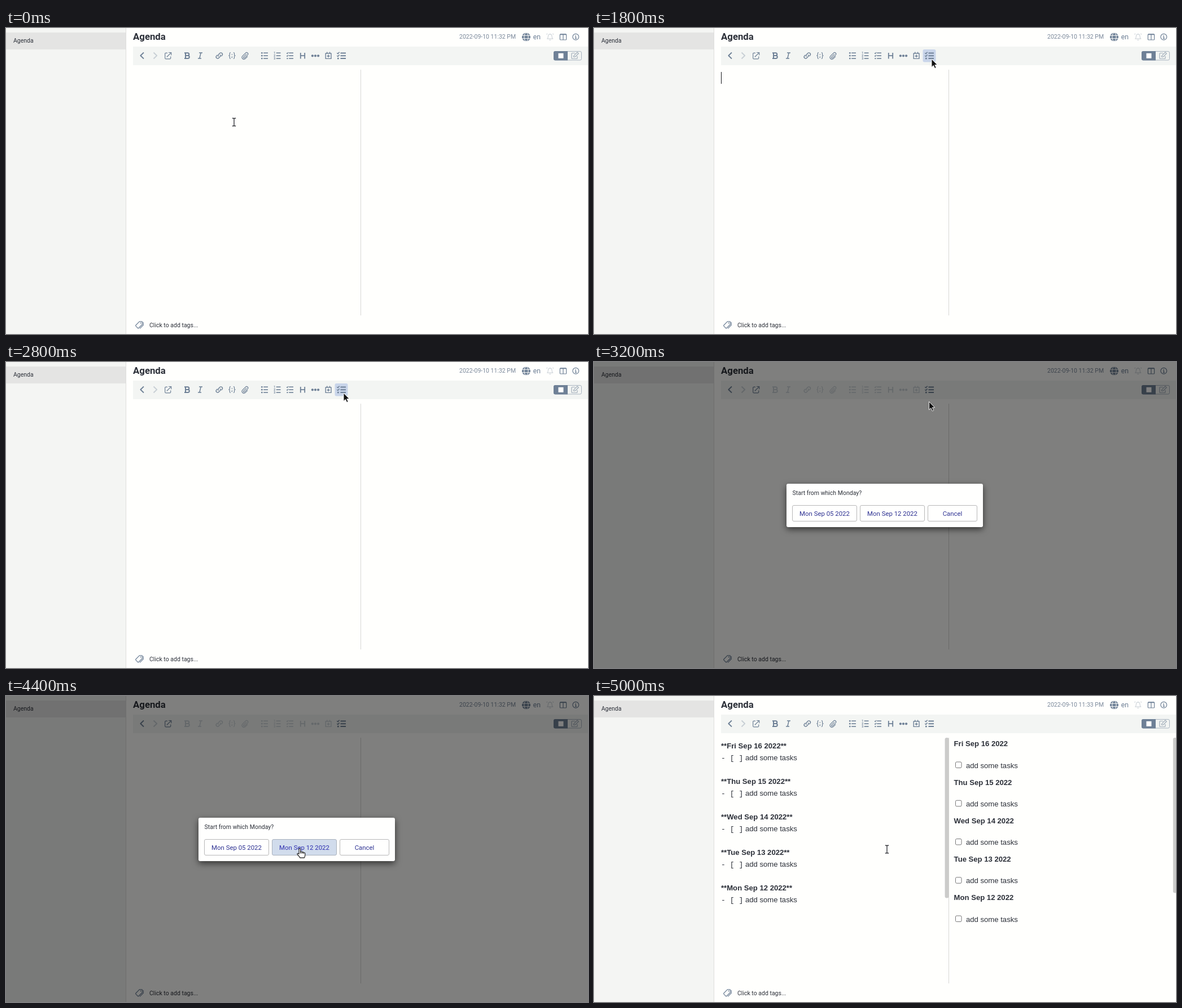
These frames come from a looping animation (1031x543 px, 6600 ms). An HTML page:

```html
<!DOCTYPE html>
<html lang="en">
<head>
<meta charset="utf-8">
<title>Agenda</title>
<style>
  html, body { margin: 0; width: 100%; height: 100%; overflow: hidden; background: #fffffd; }
  svg { display: block; width: 100vw; height: 100vh; }
  text { font: 10.5px Roboto, sans-serif; fill: #2c3039; white-space: pre; }
  .title { font-size: 16.8px; font-weight: 700; }
  .date { fill: #7b899b; }
  .body text { font: 13.125px "Liberation Sans", Arial, sans-serif; }
  .body .bold { font-weight: 700; }
  .mono { font-family: "Liberation Mono", monospace; }
  .icon { fill: none; stroke: #6e8096; stroke-width: 1.5; stroke-linejoin: round; }
  .icon .solid, .icon text { fill: #6e8096; stroke: none; }
  .thin { stroke-width: 1.2; }
  .faint { opacity: .32; }
  .blocked .edit { opacity: .3; }
  .button rect { fill: #fffffe; stroke: #b8b8b8; }
  .button text { font-size: 11.4px; fill: #2d3192; text-anchor: middle; }
  #dialog > rect { filter: drop-shadow(0 4px 6px #0009); }
  #tooltip rect { filter: drop-shadow(0 2px 2px #0005); }
</style>
</head>
<body>
<svg viewBox="0 0 1031 543">
  <rect width="1031" height="543" fill="#fffffd"/>
  <rect width="213" height="543" fill="#f4f5f3"/>
  <rect y="8" width="213" height="30" fill="#e4e4e3"/>
  <path d="M212.5 0V543" stroke="#dededc"/>
  <text x="13" y="26">Agenda</text>
  <text class="title" x="225" y="21.4">Agenda</text>
  <text class="date" id="clock" x="803" y="19.3"></text>
  <rect x="225" y="33" width="806" height="33" fill="#f3f5f3"/>
  <path d="M628.5 74V510" stroke="#d8d8d6"/>
  <rect id="hover" x="582.5" y="38" width="23" height="22.5" rx="3" fill="#c9d5ea"/>

  <g id="toolbar" class="icon">
    <path d="M244 43.5L238.3 49L244 54.5" stroke-width="1.8"/>
    <path class="faint" d="M261.5 43.5L267.2 49L261.5 54.5" stroke-width="1.8"/>
    <path class="thin" d="M286 44.3H283Q281.7 44.3 281.7 45.6V53.6Q281.7 54.8 283 54.8H290.4Q291.7 54.8 291.7 53.6V50.5M284.8 51.5L292.3 43.8M288 43.5H292.7V48.2" stroke-width="1.4"/>
    <g class="edit" id="editIcons">
      <path d="M316 44.3H322A2.3 2.3 0 0 1 322 48.9H318M322 48.9A2.5 2.5 0 0 1 322.5 53.9H316M318 44.3V53.9" stroke-width="2"/>
      <path d="M342 44H348M340 54H346M345.2 44L342.8 54"/>
      <path d="M376.3 50.8A2.8 2.8 0 0 1 376.6 47L379 44.6A2.7 2.7 0 0 1 382.8 48.4L381.3 50M379.3 47.3A2.8 2.8 0 0 1 379 51L376.6 53.4A2.7 2.7 0 0 1 372.8 49.6L374.3 48" stroke-width="1.4"/>
      <path class="thin" d="M398 43.5Q396.3 43.5 396.3 45V47.5Q396.3 49 394.6 49Q396.3 49 396.3 50.5V53Q396.3 54.5 398 54.5M402.8 43.5Q404.5 43.5 404.5 45V47.5Q404.5 49 406.2 49Q404.5 49 404.5 50.5V53Q404.5 54.5 402.8 54.5M400.4 46.2V47.8M400.6 50.5L400 53.2"/>
      <path class="thin" d="M426 46.3L420.9 51.4A1.2 1.2 0 0 0 422.7 53.1L428 47.8A2.4 2.4 0 0 0 424.4 44.3L419.1 49.6A3.4 3.4 0 0 0 424 54.4L428 50.4"/>
      <path d="M525.5 49M521.8 44V54.5M529.2 44V54.5M521.8 49.2H529.2" stroke-width="1.8"/>
      <path d="M566.2 45H576V54.4H566.2ZM568.7 42.6V45M573.5 42.6V45M571.1 47.3V52.3M568.6 49.8H573.6" stroke-width="1.4"/>
    </g>
    <path d="M592.5 44.5H602M592.5 49.2H602M592.5 54H602" stroke-width="1.9"/>
    <path d="M586.3 44.2L587.9 45.7L590.6 42.7M586.3 49L587.9 50.5L590.6 47.5"/>
    <circle class="solid" cx="588.3" cy="54" r="1.5"/>
  </g>

  <g class="icon">
    <rect x="970.5" y="41.5" width="49" height="15.5" rx="2.5" stroke="#a9b4c0" stroke-width="1"/>
    <path class="solid" d="M973 41H995V57.5H973Q970 57.5 970 54.5V44Q970 41 973 41Z"/>
    <rect x="978.5" y="44.8" width="9" height="9" style="fill:#fff;stroke:none"/>
    <path class="thin" opacity=".6" d="M1008 44.5H1003Q1002 44.5 1002 45.5V53.5Q1002 54.5 1003 54.5H1011Q1012 54.5 1012 53.5V50M1005.5 51.5L1006 49L1012 43L1014.3 45.2L1008.2 51.2Z"/>
    <circle class="solid" cx="921.5" cy="16" r="7.6"/>
    <g stroke="#fffffd" stroke-width="1"><ellipse cx="921.5" cy="16" rx="3.6" ry="7.6"/><path d="M914 13.3H929M914 18.7H929"/></g>
    <text x="933.7" y="20" style="font-size:12.25px">en</text>
    <path class="thin faint" d="M958.8 19.2Q960.5 17.5 960.5 14.5Q960.5 11.2 963.8 11.2Q967 11.2 967 14.5Q967 17.5 968.8 19.2ZM963.8 9.8V11.2M962.4 20.8Q963.8 22.2 965.2 20.8M957.5 11.5L959 10M970 11.5L968.5 10"/>
    <path class="thin" d="M982.3 10.8H991.7Q992.6 10.8 992.6 11.7V20.2Q992.6 21 991.7 21H982.3Q981.4 21 981.4 20.2V11.7Q981.4 10.8 982.3 10.8ZM981.4 11.6H992.6M987 11V21"/>
    <g class="thin"><circle cx="1009.3" cy="15.8" r="5.4"/><path d="M1008 15.3H1009.5V18.6M1007.9 18.6H1011M1009.3 12.6V13.9"/></g>
    <path class="thin" d="M236.3 520.8H240.6Q241.4 520.8 241.4 521.6V526L234.9 532.5Q234.2 533.2 233.5 532.5L229.9 528.9Q229.2 528.2 229.9 527.5ZM242.6 522.2L243.3 522.9V527L237 533.3"/>
    <circle class="solid" cx="238.7" cy="523.6" r="1"/>
  </g>
  <text x="254" y="530.8">Click to add tags...</text>

  <g class="body" id="source">
    <rect x="621.6" y="74" width="7" height="284.5" rx="3.2" fill="#cbcbca"/>
  </g>
  <g class="body" id="preview">
    <rect x="1025.8" y="74" width="7" height="275.5" rx="3.2" fill="#cbcbca"/>
  </g>
  <rect id="caret" x="225" y="78" width="1" height="21" fill="#15171b"/>

  <g id="tooltip">
    <rect x="607" y="69" width="257" height="24" rx="2" fill="#333"/>
    <text x="614" y="84.5" style="fill:#eee">Insert a weekly agenda into the current note</text>
  </g>

  <rect id="shade" width="1031" height="543" opacity=".5"/>
  <g id="dialog">
    <rect x="341" y="216" width="348" height="77" rx="3" fill="#fffffe"/>
    <text x="351.5" y="236">Start from which Monday?</text>
  </g>

  <g id="arrow"><path d="M0 0V14.5L3.3 11.4L5.8 16.6L8.2 15.5L5.8 10.5H10.2Z" fill="#111" stroke="#fff" stroke-width=".9"/></g>
  <g id="beam" fill="none">
    <path id="beamShape" d="M-3.2 -6.8H-1Q0 -6.8 0 -5.8Q0 -6.8 1 -6.8H3.2M0 -6V6M-3.2 6.8H-1Q0 6.8 0 5.8Q0 6.8 1 6.8H3.2" stroke="#fff" stroke-width="2.6"/>
    <use href="#beamShape" style="stroke:#111"/>
    <path d="M-3.2 -6.8H-1Q0 -6.8 0 -5.8Q0 -6.8 1 -6.8H3.2M0 -6V6M-3.2 6.8H-1Q0 6.8 0 5.8Q0 6.8 1 6.8H3.2" stroke="#15171b" stroke-width="1.2"/>
  </g>
  <g id="hand"><path d="M-1.5 1.2Q-1.5 0 -.2 0Q1.1 0 1.1 1.2V6Q3.2 5.2 3.8 6.6Q5.9 6 6.5 7.4Q9.3 7 9.3 9.2V12Q9.3 14 8 16.6H.2Q-1.2 13.5 -4 11Q-5.2 9.4 -3.8 8.8Q-2.8 8.5 -1.5 10ZM1.1 6V9M3.8 6.8V9.3M6.5 7.6V9.6" fill="#fff" stroke="#111" stroke-width="1.1" stroke-linejoin="round"/></g>
</svg>

<script>
const LOOP = 6600;
const $ = id => document.getElementById(id);
const add = (parent, markup) => parent.insertAdjacentHTML("beforeend", markup);
const show = (id, visible) => $(id).style.display = visible ? "" : "none";
const between = (t, from, to) => t >= from && t < to;

// Three list icons: bullets, numbers and check marks.
[458, 480.5, 503].forEach((x, kind) => {
  [44.3, 49.2, 54.1].forEach((y, row) => {
    add($("editIcons"), `<path d="M${x - 1.8} ${y}H${x + 6}" stroke-width="1.6"/>`);
    const marker = [
      `<circle class="solid" cx="${x - 4.7}" cy="${y}" r="1.4"/>`,
      `<text x="${x - 6.2}" y="${y + 1.8}" style="font-size:5px;font-weight:700">${row + 1}</text>`,
      row < 2 ? `<path class="thin" d="M${x - 6} ${y}l1.2 1.2l2 -2.4"/>`
              : `<circle class="solid" cx="${x - 4.6}" cy="${y}" r="1.2"/>`
    ][kind];
    add($("editIcons"), marker);
  });
});
for (const x of [542.9, 548, 553.1])
  add($("editIcons"), `<circle class="solid" cx="${x}" cy="49.3" r="2.1"/>`);

["Fri Sep 16", "Thu Sep 15", "Wed Sep 14", "Tue Sep 13", "Mon Sep 12"].forEach((day, i) => {
  const y = 63 * i, py = 68.25 * i;
  add($("source"), `<text class="bold" x="225" y="${93 + y}">**${day} 2022**</text>
    <text x="225" y="${114 + y}"><tspan class="mono">- [ ]</tspan> add some tasks</text>`);
  add($("preview"), `<text class="bold" x="637.6" y="${89.3 + py}">${day} 2022</text>
    <rect x="640.5" y="${117 + py}" width="10.5" height="10.5" rx="2" fill="#fff" stroke="#777"/>
    <text x="659" y="${127.7 + py}">add some tasks</text>`);
});

[["Mon Sep 05 2022", 351.5, 114], ["Mon Sep 12 2022", 471.5, 114], ["Cancel", 591.5, 87]]
  .forEach(([label, x, width]) => add($("dialog"), `<g class="button">
    <rect x="${x}" y="254.5" width="${width}" height="28" rx="2.5"/>
    <text x="${x + width / 2}" y="272.8">${label}</text></g>`));
const choice = document.querySelectorAll(".button")[1];

// Pointer steps: start time, shape, x, y.
const pointer = [
  [0, "beam", 404, 167], [600, "beam", 456, 158.5], [800, "beam", 535, 123], [1000, "beam", 568, 87],
  [1200, "arrow", 587.5, 70.5], [1400, "arrow", 598, 55], [3200, "arrow", 593.5, 70.3],
  [3400, "arrow", 560.5, 143.5], [3600, "arrow", 527.5, 200.5], [3800, "arrow", 522.5, 253],
  [4000, "hand", 520.5, 264.5], [4400, "hand", 520.5, 270.5], [4600, "beam", 519, 272]
];
const caretOn = [[400, 1000], [1800, 2400], [2600, 2800]];

function draw(now) {
  const t = now % LOOP;
  const asking = between(t, 3200, 4600);
  const [, shape, x, y] = pointer.findLast(step => step[0] <= t);
  for (const name of ["beam", "arrow", "hand"]) show(name, name === shape);
  $(shape).setAttribute("transform", `translate(${x} ${y})`);

  show("caret", caretOn.some(([from, to]) => between(t, from, to)));
  show("hover", between(t, 1200, 3200));
  show("tooltip", between(t, 2000, 2800));
  show("shade", asking);
  show("dialog", asking);
  show("source", t >= 4600);
  show("preview", t >= 5000);
  $("toolbar").classList.toggle("blocked", asking);
  $("clock").textContent = `2022-09-10 11:${t < 4800 ? 32 : 33} PM`;

  const [box, label] = choice.children;
  box.style.fill = t >= 4400 ? "#d1dcec" : t >= 4000 ? "#e3eaf4" : "";
  box.style.stroke = t >= 4400 ? "#a9b1bc" : "";
  label.style.fill = t >= 4000 ? "#2f30b0" : "";
  requestAnimationFrame(draw);
}
draw(performance.now());
</script>
</body>
</html>
```
